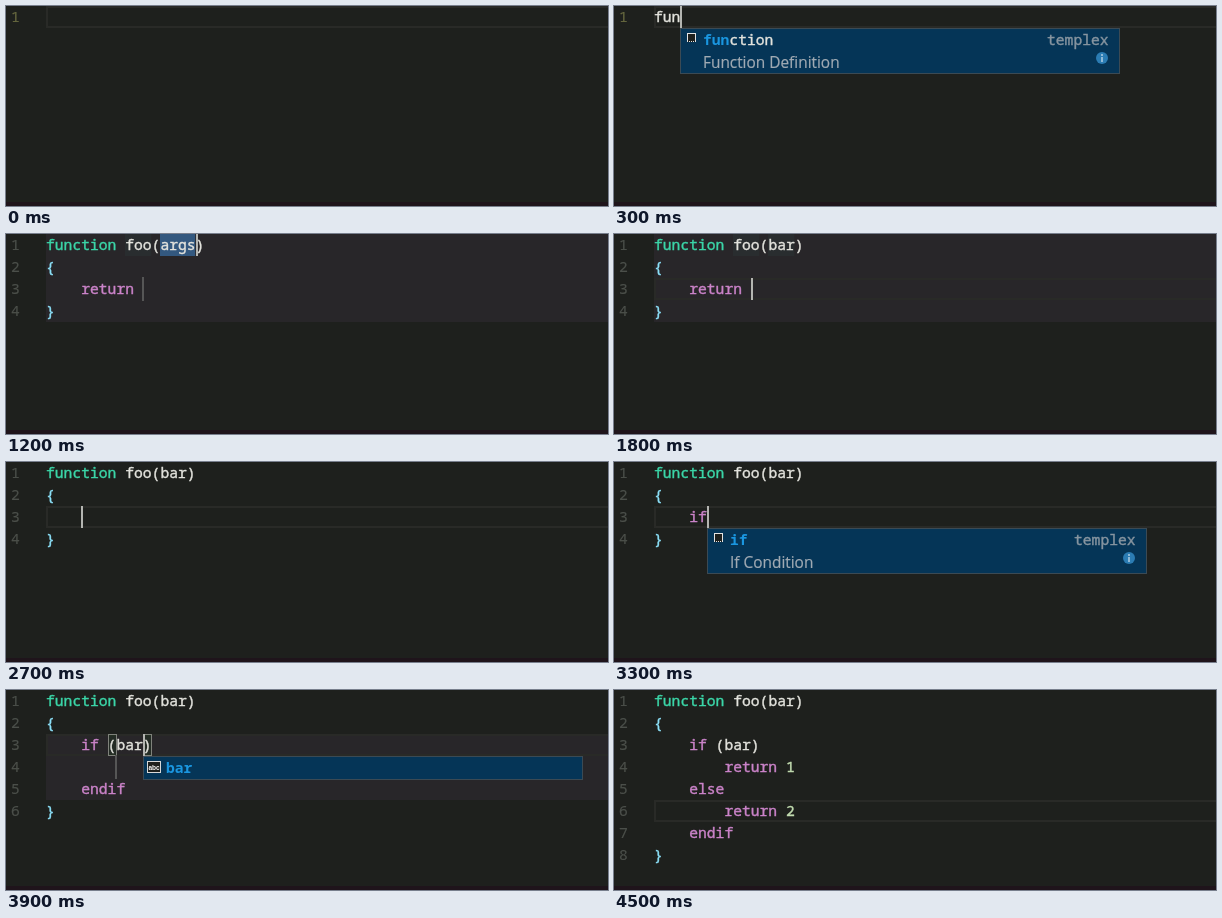
Animation of 602x200 px, one loop 4.8 s. Source, as an HTML page with a canvas:

```html
<!DOCTYPE html>
<html lang="en">
<head>
<meta charset="utf-8">
<title>Snippet demo</title>
<style>
html, body { margin: 0; width: 100%; height: 100%; overflow: hidden; background: #1e201d; }
canvas { display: block; width: 602px; height: 200px; }
</style>
</head>
<body>
<canvas id="stage" width="602" height="200"></canvas>
<script>
const ctx = document.getElementById('stage').getContext('2d');
const STEP = 300, LEFT = 40, CHAR = 8.8, ROW = 22;
const MONO = '14.67px "Noto Sans Mono", monospace';
const SANS = '15.4px "Open Sans", sans-serif';
const INK = '#e3e3dd';

const colX = col => Math.round(LEFT + col * CHAR);
const rowY = row => row * ROW;

function fill(x, y, w, h, color) {
  ctx.fillStyle = color;
  ctx.fillRect(x, y, w, h);
}

function outline(x, y, w, h, color, line = 1) {
  ctx.strokeStyle = color;
  ctx.lineWidth = line;
  ctx.strokeRect(x + line / 2, y + line / 2, w - line, h - line);
}

// A hairline stroke gives regular text its sturdier weight.
function write(text, x, y, color, font = MONO, weight = 0.4) {
  ctx.font = font;
  ctx.fillStyle = ctx.strokeStyle = color;
  ctx.lineWidth = weight;
  ctx.fillText(text, x, y);
  if (weight) ctx.strokeText(text, x, y);
}

const fn = (name, arg, body) => [`function ${name}(${arg})`, '{', '    ' + body, '}'];
const branch = (cond, ...body) =>
  ['function foo(bar)', '{', `    if (${cond})`, ...body, '    endif', '}'];

// at: caret cell, off: caret hidden, sel: selected length before the caret,
// snip: rows of the active snippet, stop: waiting tab stop,
// fields: [row, col, length], pair: matching bracket cells
const states = [
  { lines: [''], at: [0, 0], off: true, fresh: true },
  { lines: ['fun'], at: [0, 3], fresh: true,
    pop: { label: 'function', hit: 3, note: 'Function Definition' } },
  { lines: fn('name', 'args', 'return '), at: [0, 13], sel: 4, snip: [0, 4],
    stop: [2, 11], fields: [[0, 14, 4]] },
  { lines: fn('foo', 'args', 'return '), at: [0, 12], pair: [[0, 12], [0, 17]] },
  { lines: fn('foo', 'args', 'return '), at: [0, 17], sel: 4, snip: [0, 4],
    stop: [2, 11], fields: [[0, 9, 3]] },
  { lines: fn('foo', 'bar', 'return '), at: [0, 16], snip: [0, 4],
    stop: [2, 11], fields: [[0, 9, 3], [0, 13, 3]], pair: [[0, 12], [0, 16]] },
  { lines: fn('foo', 'bar', 'return '), at: [2, 11], snip: [0, 4],
    fields: [[0, 9, 3], [0, 13, 3]] },
  { lines: fn('foo', 'bar', 'return bar'), at: [2, 14] },
  { lines: fn('foo', 'bar', 'ret'), at: [2, 7], off: true },
  { lines: fn('foo', 'bar', ''), at: [2, 4] },
  { lines: fn('foo', 'bar', 'i'), at: [2, 5],
    pop: { label: 'if', hit: 1, note: 'If Condition' } },
  { lines: fn('foo', 'bar', 'if'), at: [2, 6],
    pop: { label: 'if', hit: 2, note: 'If Condition' } },
  { lines: branch('condition', ''), at: [2, 17], sel: 9, snip: [2, 5], stop: [3, 8] },
  { lines: branch('bar', ''), at: [2, 11], snip: [2, 5], stop: [3, 8],
    pair: [[2, 7], [2, 11]], pop: { label: 'bar', hit: 3 } },
  { lines: branch('bar', '        return 1', '    else', ''), at: [5, 8] },
  { lines: branch('bar', '        return 1', '    else', '        return 2'),
    at: [5, 16], off: true }
];

function tokenColor(token) {
  if (token === 'function') return '#3bd6a8';
  if (/^(return|if|else|endif)$/.test(token)) return '#cb83c9';
  if (/^[{}]$/.test(token)) return '#8ce0f8';
  return /^\d/.test(token) ? '#c2dcb0' : INK;
}

function drawLine(text, row) {
  for (const m of text.matchAll(/\w+|[^\s\w]/g))
    write(m[0], LEFT + m.index * CHAR, rowY(row) + 16, tokenColor(m[0]));
}

function snippetIcon(x, y) {
  fill(x, y, 9, 9, '#1e201d');
  outline(x, y, 9, 9, '#e4e4e4');
  for (let i = 1; i < 9; i += 2) fill(x + i, y + 8, 1, 1, '#1e201d');
}

function wordIcon(x, y) {
  fill(x, y, 14, 12, '#1e201d');
  outline(x, y, 14, 12, '#d8d8d8');
  write('abc', x + 1.5, y + 8.5, '#ffffff', 'bold 6.5px "Liberation Sans", sans-serif', 0);
}

function infoIcon(x, y) {
  ctx.beginPath();
  ctx.arc(x, y, 6, 0, Math.PI * 2);
  ctx.fillStyle = '#2b7cb3';
  ctx.fill();
  fill(x - 1, y - 4, 2, 2, '#8fb9d6');
  fill(x - 1, y - 1, 2, 5, '#8fb9d6');
}

function drawPopup({ label, hit, note }, [row, col]) {
  const x = colX(col), y = rowY(row + 1), h = note ? 46 : 24;
  fill(x, y, 440, h, '#053557');
  outline(x, y, 440, h, '#3b4a54');
  write(label.slice(0, hit), x + 23, y + 17, '#1a96e0', 'bold ' + MONO, 0);
  write(label.slice(hit), x + 23 + hit * CHAR, y + 17, INK);
  if (!note) return wordIcon(x + 4, y + 5);
  snippetIcon(x + 7, y + 5);
  write('templex', x + 367, y + 17, '#8795a0');
  write(note, x + 23, y + 40, '#a0aab3', SANS, 0.2);
  infoIcon(x + 422, y + 30);
}

function draw(s) {
  const [row, col] = s.at;
  fill(0, 0, 602, 200, '#1e201d');
  if (s.snip) fill(LEFT, rowY(s.snip[0]), 562, rowY(s.snip[1] - s.snip[0]), '#282629');
  for (const [r, c, n] of s.fields || []) fill(colX(c), rowY(r), n * CHAR, ROW, '#292d2f');
  if (s.sel) fill(colX(col - s.sel), rowY(row), s.sel * CHAR, ROW, '#33587f');
  else outline(LEFT, rowY(row), 570, ROW, '#292a27', 2);
  for (const [r, c] of s.pair || []) {
    fill(colX(c), rowY(r), 9, ROW, 'rgba(0,100,0,0.1)');
    outline(colX(c), rowY(r), 9, ROW, '#7f827b');
  }
  if (s.stop) fill(colX(s.stop[1]) - 1, rowY(s.stop[0]) - 1, 2, 24, '#565656');
  s.lines.forEach((text, i) => {
    write(i + 1, 5, rowY(i) + 16, s.fresh ? '#66673f' : '#4b4f4a', MONO, 0.2);
    drawLine(text, i);
  });
  if (!s.off) fill(colX(col), rowY(row), 2, ROW, '#b4b5b1');
  if (s.pop) drawPopup(s.pop, s.at);
  fill(0, 196, 602, 4, '#1f141b');
}

const start = performance.now();
function tick() {
  const time = performance.now() - start;
  draw(states[Math.floor(time / STEP) % states.length]);
  requestAnimationFrame(tick);
}
tick();
</script>
</body>
</html>
```
